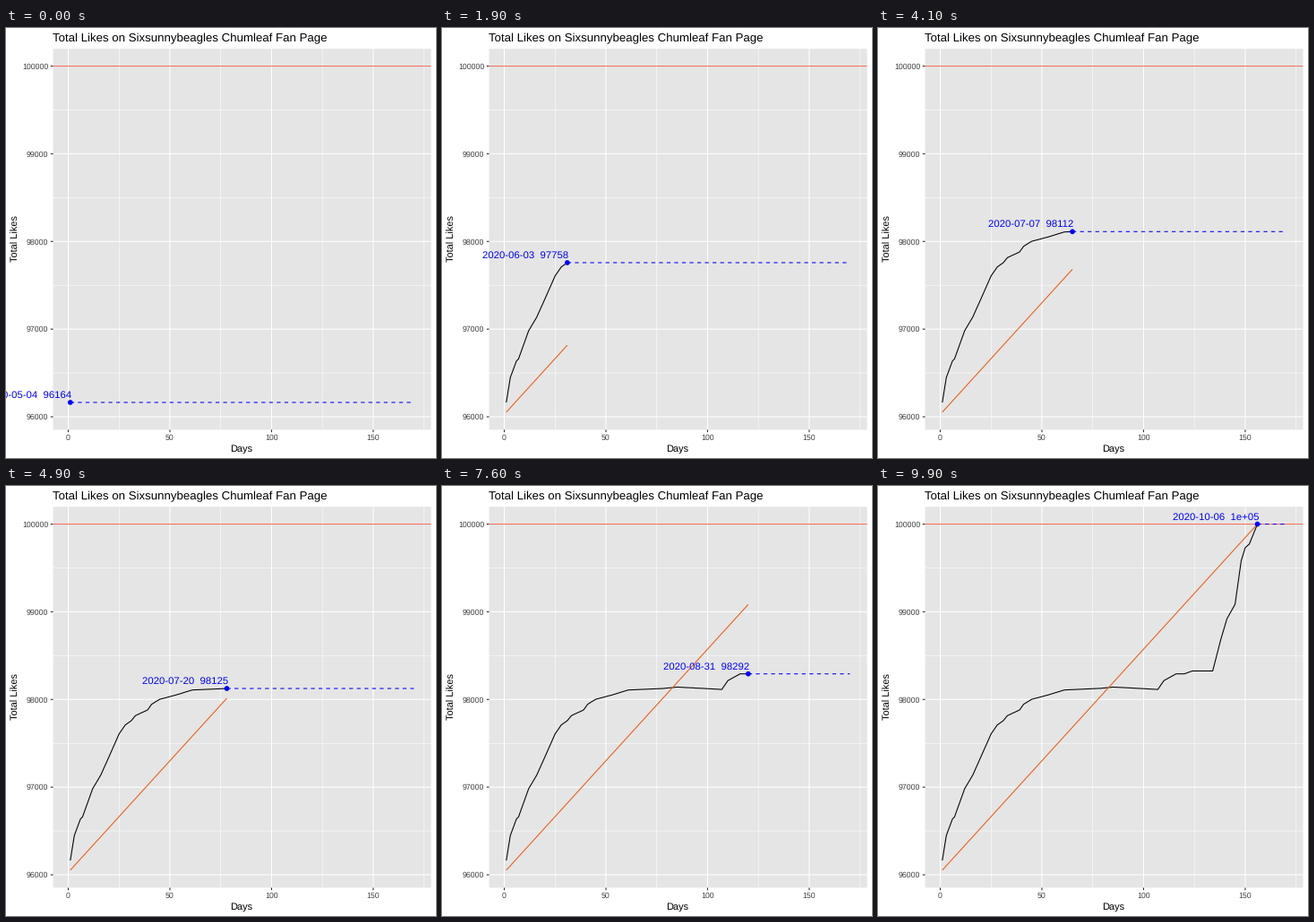
Animation, 480 px wide and 480 px high, one loop 10000 ms. Source, as a matplotlib script:

```python
import matplotlib.pyplot as plt
import numpy as np
from matplotlib.animation import FuncAnimation
from matplotlib.patches import Circle, Rectangle

SIZE, FRAMES, DAYS = 480, 100, 156
LEFT, RIGHT, TOP, BOTTOM = 52.6, 474.5, 23.2, 448.45
X_MIN, X_MAX = -7.45, 178.45
Y_MIN, Y_MAX = 95852.5, 100197.5
GOAL, LAST_X = 100000, 170
THICK, THIN = 1.067, 0.533

plt.rcParams.update({
    "font.family": "Liberation Sans",
    "text.hinting": "none",
    "lines.solid_capstyle": "butt",
    "lines.dash_capstyle": "butt",
    "lines.solid_joinstyle": "round",
})


def px(day):
    return LEFT + (day - X_MIN) / (X_MAX - X_MIN) * (RIGHT - LEFT)


def py(likes):
    return BOTTOM - (likes - Y_MIN) / (Y_MAX - Y_MIN) * (BOTTOM - TOP)


# Turning points of the curve: day, likes.
TURNS = [(1, 96164), (3, 96450), (6, 96637), (7, 96660), (12, 96982),
         (16, 97138), (20, 97345), (25, 97607), (28, 97708), (31, 97758),
         (33, 97815), (39, 97880), (41, 97945), (45, 98002), (53, 98051),
         (61, 98108), (78, 98125), (85, 98141), (97, 98127), (107, 98114),
         (110, 98215), (116, 98292), (120, 98292), (124, 98325),
         (134, 98325), (138, 98685), (141, 98920), (145, 99085),
         (148, 99580), (150, 99732), (152, 99772), (156, GOAL)]

days = np.arange(1, DAYS + 1)
likes = np.rint(np.interp(days, *zip(*TURNS))).astype(int)
trend = np.linspace(96053, GOAL, DAYS)
dates = np.datetime64("2020-05-04") + np.arange(DAYS)

fig = plt.figure(figsize=(SIZE / 72, SIZE / 72), dpi=72, facecolor="white")
ax = fig.add_axes([0, 0, 1, 1])
ax.set_xlim(0, SIZE)
ax.set_ylim(SIZE, 0)
ax.axis("off")


def line(xs, ys, color, width=THICK, **kw):
    return ax.plot(xs, ys, color=color, lw=width, snap=False, **kw)[0]


def text(x, y, s, size, color="black", ha="center", **kw):
    return ax.text(x, y, s, size=size, color=color, ha=ha, va="baseline", **kw)


def grid(x_step, x_start, y_start, width):
    for n in np.arange(y_start, GOAL + 1, 1000):
        line([LEFT, RIGHT], [py(n)] * 2, "white", width, zorder=1)
    for day in np.arange(x_start, X_MAX, x_step):
        line([px(day)] * 2, [TOP, BOTTOM], "white", width, zorder=1)


ax.add_patch(Rectangle((LEFT, TOP), RIGHT - LEFT, BOTTOM - TOP,
                       fc="#e5e5e5", lw=0, snap=False, zorder=0))
grid(50, 25, 96500, THIN)
grid(50, 0, 96000, THICK)

for n in range(96000, GOAL + 1, 1000):
    line([LEFT - 2.75, LEFT], [py(n)] * 2, "#2b2b2b")
    text(LEFT - 5.2, py(n) + 3.2, str(n), 8.8, "#404040", "right")
for n in range(0, 151, 50):
    line([px(n)] * 2, [BOTTOM, BOTTOM + 2.75], "#2b2b2b")
    text(px(n), BOTTOM + 11.4, str(n), 8.8, "#404040")

text(LEFT - 0.3, 15, "Total Likes on Sixsunnybeagles Chumleaf Fan Page", 13.2, ha="left")
text((LEFT + RIGHT) / 2 - 0.5, 473, "Days", 11)
text(14, (TOP + BOTTOM) / 2 - 1, "Total Likes", 11, rotation=90, rotation_mode="anchor")

line([LEFT, RIGHT], [py(GOAL)] * 2, "#f96f5d", zorder=3)
curve = line([], [], "black", zorder=4)
slope = line([], [], "#e95e14", zorder=5)
dashes = line([], [], "blue", ls=(0, (4, 4)), zorder=6)
dot = ax.add_patch(Circle((0, 0), 2.85, fc="blue", lw=0, snap=False, zorder=7))
label = text(0, 0, "", 11.38, "blue", "right", zorder=8)


def draw(i):
    k = int((i + 0.5) * (DAYS - 1) / (FRAMES - 1))
    x, y = px(days[k]), py(likes[k])
    shown = slice(0, k + 1)
    curve.set_data(px(days[shown]), py(likes[shown]))
    slope.set_data(px(days[shown]), py(trend[shown]))
    dashes.set_data([x, px(LAST_X)], [y, y])
    dot.center = x, y
    count = "1e+05" if likes[k] == GOAL else str(likes[k])
    label.set_text(f"{dates[k]}  {count}")
    label.set_position((x + 1.7, y - 5.1))
    return curve, slope, dashes, dot, label


anim = FuncAnimation(fig, draw, frames=FRAMES, interval=100, repeat=True)
plt.show()
```
